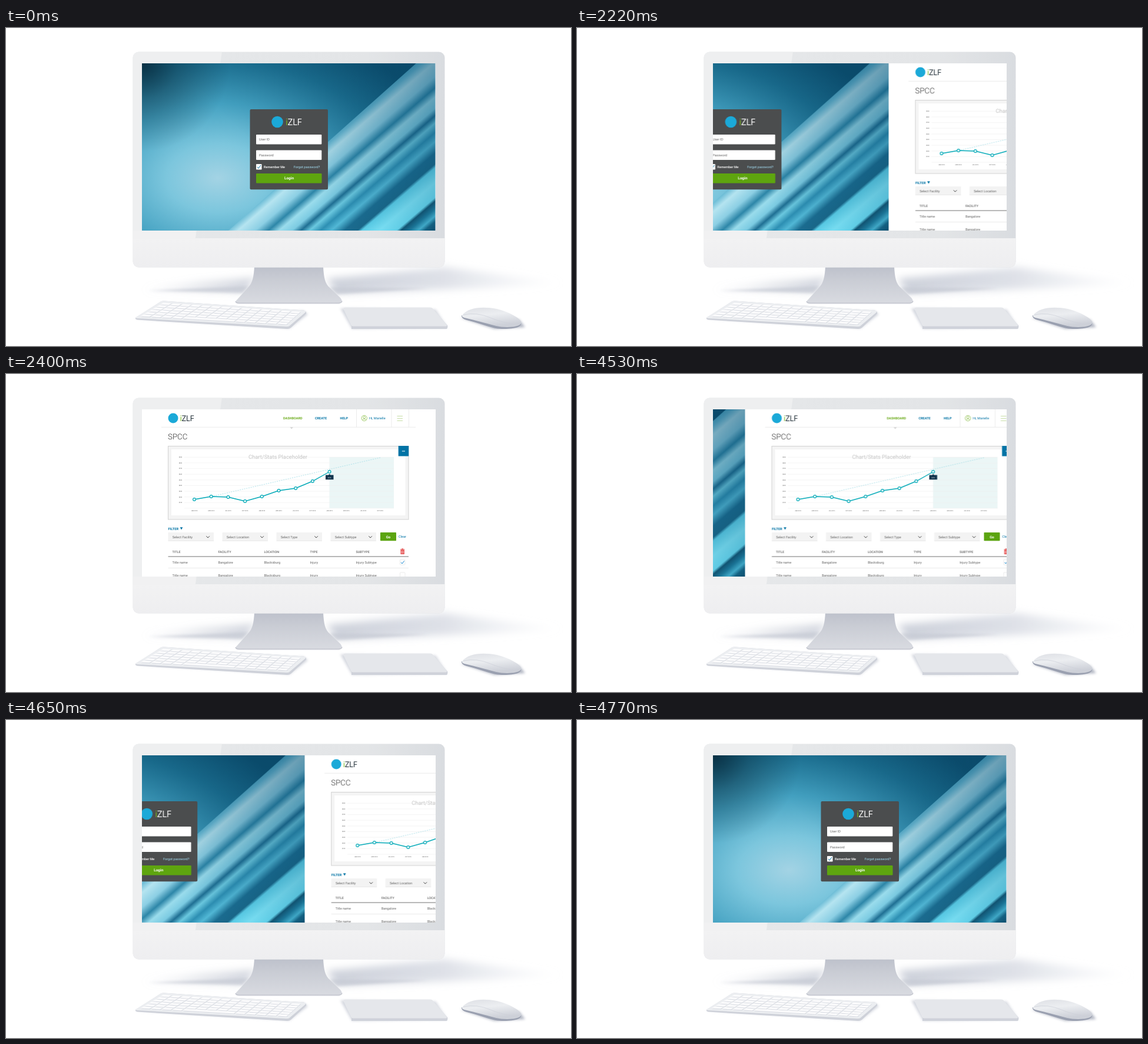
An HTML page for the animation above (4800 ms loop, 960 px wide and 540 px high).

```html
<!DOCTYPE html>
<html lang="en">
<head>
<meta charset="utf-8">
<title>Desktop login and dashboard</title>
<style>
  html, body { margin: 0; width: 100%; height: 100%; overflow: hidden; background: #fff; }
  svg { display: block; width: 100%; height: 100%; }
  text { font-family: Roboto, Arial, sans-serif; font-size: 5.6px; fill: #666; text-rendering: geometricPrecision; }
  .medium { font-weight: 500; }
  .bold { font-weight: 700; }
  .mid { text-anchor: middle; }
  .blue { fill: #0073a5; }
  .white { fill: #fff; }
  .head { font-size: 5.4px; font-weight: 500; }
  .tiny { font-size: 2.4px; font-weight: 500; }
  .brand { font-family: "Open Sans", Arial, sans-serif; letter-spacing: -.4px; }
  .brand tspan { fill: #7ab81e; }
  .rule { stroke: #e6e6e6; stroke-width: .8; fill: none; }

  #strip { animation: slide 4800ms infinite; }
  @keyframes slide {
    0% { transform: translateX(0); animation-timing-function: linear; }
    44.375% { transform: translateX(0); animation-timing-function: steps(10, jump-start); }
    50.625% { transform: translateX(-499px); animation-timing-function: linear; }
    94.375% { transform: translateX(-499px); animation-timing-function: steps(9, jump-start); }
    100% { transform: translateX(0); }
  }
</style>
</head>
<body>
<svg viewBox="0 0 960 540" xmlns="http://www.w3.org/2000/svg">
  <defs>
    <clipPath id="screen"><rect x="231" y="60" width="499" height="284"/></clipPath>
    <clipPath id="case"><rect x="215.5" y="40.5" width="530" height="366" rx="10"/></clipPath>
    <radialGradient id="glow" gradientUnits="userSpaceOnUse" cx="0" cy="0" r="1" gradientTransform="translate(360 255) scale(400 265)">
      <stop offset="0" stop-color="#a3d3e4"/>
      <stop offset=".22" stop-color="#7cc6dd"/>
      <stop offset=".48" stop-color="#43a1c1"/>
      <stop offset=".75" stop-color="#1d7293"/>
      <stop offset="1" stop-color="#0d506f"/>
    </radialGradient>
    <radialGradient id="corner" gradientUnits="userSpaceOnUse" cx="231" cy="60" r="150">
      <stop offset="0" stop-color="#041a28" stop-opacity=".72"/>
      <stop offset=".4" stop-color="#041a28" stop-opacity=".35"/>
      <stop offset="1" stop-color="#041a28" stop-opacity="0"/>
    </radialGradient>
    <linearGradient id="streaks" gradientUnits="userSpaceOnUse" x1="426" y1="288" x2="582" y2="470.4"></linearGradient>
    <linearGradient id="dusk" gradientUnits="userSpaceOnUse" x1="520" y1="290" x2="735" y2="60">
      <stop offset="0" stop-color="#064265" stop-opacity="0"/>
      <stop offset="1" stop-color="#064265" stop-opacity=".45"/>
    </linearGradient>
    <linearGradient id="bezel" x1="0" x2="1">
      <stop offset="0" stop-color="#e6e8ea"/>
      <stop offset=".75" stop-color="#e3e5e7"/>
      <stop offset="1" stop-color="#d9dce0"/>
    </linearGradient>
    <linearGradient id="chin" x1="0" x2="0" y1="0" y2="1">
      <stop offset="0" stop-color="#f2f2f3"/>
      <stop offset="1" stop-color="#eeeef0"/>
    </linearGradient>
    <linearGradient id="neck" x1="0" x2="0" y1="0" y2="1">
      <stop offset="0" stop-color="#bdc1cb"/>
      <stop offset=".35" stop-color="#c9ccd4"/>
      <stop offset="1" stop-color="#d9dbe1"/>
    </linearGradient>
    <linearGradient id="fadeLeft" x1="1" x2="0">
      <stop offset="0" stop-color="#b4bac8"/>
      <stop offset="1" stop-color="#c3c8d4" stop-opacity=".15"/>
    </linearGradient>
    <linearGradient id="fadeRight" x1="0" x2="1">
      <stop offset="0" stop-color="#b4bac8"/>
      <stop offset=".5" stop-color="#d0d4de"/>
      <stop offset="1" stop-color="#e6e9ef" stop-opacity=".1"/>
    </linearGradient>
    <linearGradient id="shell" x1="0" x2=".3" y1="0" y2="1">
      <stop offset="0" stop-color="#dee0e5"/>
      <stop offset=".45" stop-color="#eceef1"/>
      <stop offset="1" stop-color="#cdd0d8"/>
    </linearGradient>
    <filter id="soft" x="-20%" y="-60%" width="140%" height="220%"><feGaussianBlur stdDeviation="7"/></filter>
    <filter id="near" x="-20%" y="-60%" width="140%" height="220%"><feGaussianBlur stdDeviation="2"/></filter>
  </defs>

  <rect width="960" height="540" fill="#fff"/>

  <!-- floor shadows -->
  <g filter="url(#soft)">
    <path d="M232 445 L330 431 L425 424 L405 448 Z" fill="url(#fadeLeft)" opacity=".65"/>
    <path d="M545 426 L745 406 L945 433 L820 441 L562 450 Z" fill="url(#fadeRight)" opacity=".7"/>
  </g>
  <g filter="url(#near)" fill="#c3c7d2" opacity=".7">
    <path d="M240 446 L412 438 L402 450 Z"/>
    <path d="M550 440 L720 442 L562 452 Z"/>
    <path d="M222 494 L482 510 L513 486 L505 480 Z"/>
    <path d="M568 476 L588 511 L750 509 L730 478 Z"/>
    <path d="M772 492 L830 511 L882 508 L872 495 Z" fill="#9399aa"/>
  </g>

  <!-- stand -->
  <path d="M422 405 H539 C540 424 542 434 550 441 L568 458 Q573 464 569 467 L566 468.5 H395 Q388 467 391 463 L411 441 C419 433 421 422 422 405 Z" fill="url(#neck)"/>
  <path d="M390 464 Q390 467 397 467 H564 Q571 467 571 463.500" fill="none" stroke="#bfc2cc" stroke-width="1.200"/>

  <!-- monitor -->
  <g clip-path="url(#case)">
    <rect x="215" y="40" width="531" height="367" fill="url(#bezel)"/>
    <path d="M215 40 H367 L322 357 H215 Z" fill="#eeeff0"/>
    <rect x="215" y="357" width="531" height="50" fill="url(#chin)"/>
    <rect x="215" y="344" width="107" height="14" fill="#f1f1f2"/>
  </g>

  <g clip-path="url(#screen)">
    <g id="strip">
      <g id="login">
        <rect x="231" y="60" width="499" height="284" fill="url(#glow)"/>
        <rect x="231" y="60" width="499" height="284" fill="url(#corner)"/>
        <path d="M360 360 L708 50 H730 V344 Z" fill="url(#streaks)"/>
        <rect x="231" y="60" width="499" height="284" fill="url(#dusk)"/>
        <rect x="414.500" y="138" width="132.500" height="136.300" rx="2" fill="#4b4d4e"/>
        <circle cx="461" cy="159.500" r="9.800" fill="#1ba9d8"/>
        <text class="brand white" x="475" y="165" style="font-size:15.500px"><tspan>i</tspan>ZLF</text>
        <g fill="#fff">
          <rect x="425" y="181" width="111.300" height="16.500" rx="1"/>
          <rect x="425" y="207.500" width="111.300" height="16.500" rx="1"/>
          <rect x="425" y="231" width="9.500" height="9.500" rx=".8"/>
        </g>
        <path d="M427 236 L429 238.300 L432.800 233" fill="none" stroke="#0a75a8"/>
        <text x="430" y="191.200">User ID</text>
        <text x="430" y="217.800">Password</text>
        <text class="medium white" x="438" y="237.800" style="font-size:5.500px">Remember Me</text>
        <text x="488.700" y="237.800" style="fill:#a5dff4">Forgot password?</text>
        <rect x="425" y="247" width="111.500" height="16.500" rx="1" fill="#5ea50f"/>
        <text class="bold white mid" x="481" y="257.300" style="font-size:6.400px">Login</text>
      </g>

      <g transform="translate(499 0)">
        <rect x="230.500" y="60" width="500" height="284" fill="#fff"/>
        <circle cx="284" cy="75" r="8.500" fill="#1ba9d8"/>
        <text class="brand" x="295.500" y="79.800" style="font-size:13.500px;fill:#1c2a33"><tspan>i</tspan>ZLF</text>
        <path class="rule" d="M264 90.300 H696 M595.500 60 V90 M655 60 V90 M684.500 60 V90"/>
        <path d="M482.500 90.300 H488 L485.200 93.500 Z" fill="#d5d5d5"/>
        <text class="bold" x="471" y="77" style="fill:#6bab1a;font-size:5.500px">DASHBOARD</text>
        <text class="bold blue" x="525" y="77" style="font-size:5.500px">CREATE</text>
        <text class="bold blue" x="567.500" y="77" style="font-size:5.500px">HELP</text>
        <text class="blue" x="617" y="77">Hi, Marielle</text>
        <g fill="none" stroke="#8fc04d" stroke-width=".8">
          <circle cx="608.700" cy="75" r="4.700"/>
          <circle cx="608.700" cy="73.800" r="1.900"/>
          <path d="M605.500 78.200 Q608.700 74.300 612 78.200"/>
          <path d="M664.500 71.500 H674 M664.500 75.400 H674 M664.500 79.300 H674" stroke="#b5d48c"/>
        </g>
        <text x="275" y="111" style="font-size:13.300px;font-weight:300;fill:#333">SPCC</text>

        <rect x="275.500" y="122.500" width="408.500" height="124.500" fill="#f4f4f4" stroke="#d2d2d2"/>
        <rect x="281" y="128" width="397.500" height="112" fill="#fff"/>
        <rect x="549.500" y="141" width="109.500" height="87" fill="#ebf6f6"/>
        <g id="chart"></g>
        <text class="mid" x="462" y="144" style="font-size:9.400px;fill:#c4c4c4">Chart/Stats Placeholder</text>
        <rect x="666.700" y="122" width="17.500" height="17.500" fill="#0073a5"/>
        <path d="M672.800 131 H678" stroke="#fff"/>

        <text class="bold blue" x="275.500" y="264.500" style="font-size:5.700px">FILTER</text>
        <path d="M295.700 260.200 H300.300 L298 264.500 Z" fill="#0073a5"/>
        <g id="filters"></g>
        <rect x="636" y="269" width="27" height="14.300" rx=".8" fill="#5ba410"/>
        <text class="bold white mid" x="649.500" y="278.500" style="font-size:6px">Go</text>
        <text class="blue" x="667" y="278.400">Clear</text>

        <g id="table"></g>
        <path d="M275.500 310 H684" stroke="#707070" stroke-width="1.200"/>
        <path class="rule" d="M275.500 329.500 H684"/>
        <path d="M670 298 H677.300 M672.300 297 H675 M671 299.500 H676.300 V305.500 H671 Z M672.800 300 V305 M674.600 300 V305" fill="none" stroke="#e23b3b" stroke-width="1.100"/>
        <rect class="rule" x="669.500" y="315" width="8.500" height="9" rx="1"/>
        <rect class="rule" x="669.500" y="337" width="8.500" height="9" rx="1"/>
        <path d="M671 319.800 L673 322 L676.700 317.300" fill="none" stroke="#1886d0"/>
      </g>
    </g>
  </g>

  <!-- keyboard -->
  <path d="M220 492 L263 464.500 Q265 463 269 463.500 L506 479.500 Q511 481 510 485 L484 509 Q481 511.500 477 511 L223 495.500 Q219 495 220 492 Z" fill="#ced1d9"/>
  <path d="M220 491.500 L263 464.500 Q265 463 269 463.500 L506 479.500 Q511 480.500 508 483.500 L482 505.500 Q480 507.500 476 507 L223 493 Q219 492.500 220 491.500 Z" fill="#eceef1"/>
  <g id="keys" fill="#fbfbfc"></g>

  <!-- notepad -->
  <path d="M574 475 L587 506 V511 H749 Q751 508 750 505 L723 475 Z" fill="#cfd2da"/>
  <path d="M577 474.500 H721 Q723 474.500 725 476.500 L749 504 Q750 506 747 506.500 H590 Q587 506.500 586 504 L573.500 477.500 Q573 474.500 577 474.500 Z" fill="#e5e7eb"/>

  <!-- mouse -->
  <path d="M774 488 Q773 493 783 496 C800 500 815 506 832 510 C845 512 868 511 873 506 Q878 502 872 496 Z" fill="#9aa0b0"/>
  <path d="M775 488 C784 475 808 472 834 477 C858 483 878 495 875 502 C870 509 846 509 833 506 C812 500.500 796 496 783 493 Q773 491 775 488 Z" fill="url(#shell)"/>
  <path d="M777 487 Q800 482 823 492 T873 503" fill="none" stroke="#cdd0d8" stroke-width=".7"/>
</svg>

<script>
  const fill = (id, parts) => { document.getElementById(id).innerHTML = parts.join(''); };
  const label = (x, y, words, cls = '') => `<text class="${cls}" x="${x}" y="${y}">${words}</text>`;
  const range = n => [...Array(n).keys()];

  // bands across the diagonal: position in percent, colour
  const bands = '0 4aa6c4,4 6cbcd6,9 b5e4f0,17 8ccfe4,23 2d86a8,28 9adcec,34 7ccbe2,38 1f6f93,' +
    '42 6bc9e0,47 2d8fb3,52 52b8d6,58 1b6c90,64 1a688a,66 5cd0ea,74 7ee6fa,82 6adcf4,' +
    '84 135674,88 1e7c9e,92 49b8d6,95 176687,100 0f4f6f';
  fill('streaks', bands.split(',').map(band => {
    const [at, hue] = band.split(' ');
    return `<stop offset="${at}%" stop-color="#${hue}"/>`;
  }));

  const xAt = i => 320 + 28.7 * i;
  const months = ['JAN', 'APR', 'JUL', 'OCT'];
  const levels = [213, 208, 209, 216, 208, 198, 194, 182, 166];
  const points = levels.map((y, i) => [xAt(i), y]);
  fill('chart', [
    ...range(10).map(i => `<path d="M303 ${141.3 + 9.63 * i} H659" stroke="#efefef" stroke-width=".6"/>`),
    ...range(9).map(i => label(293.7, 142.2 + 9.63 * i, `$${900 - 100 * i}`, 'tiny')),
    ...range(12).map(i => label(xAt(i), 232.8, `${months[i % 4]} 2015`, 'tiny mid')),
    '<path d="M349 208 L636 142" stroke="#a8dfe8" stroke-width=".9" stroke-dasharray="2 1.800"/>',
    `<polyline points="${points.join(' ')}" fill="none" stroke="#00a9b7" stroke-width="1.400"/>`,
    ...points.map(([x, y]) => `<circle cx="${x}" cy="${y}" r="2.400" fill="#fff" stroke="#00a9b7" stroke-width="1.200"/>`),
    '<path d="M543 171.500 H548 L549.700 169.700 L551.400 171.500 H556.500 V179.300 H543 Z" fill="#12344d"/>',
    label(549.7, 176.5, '$674', 'tiny mid white')
  ]);

  fill('filters', ['Facility', 'Location', 'Type', 'Subtype'].map((name, i) => {
    const x = 275.5 + 92 * i;
    return `<rect x="${x}" y="269" width="77.500" height="14.500" rx=".8" fill="#f3f3f3"/>
      <path d="M${x} 283.300 h77.500" stroke="#dedede" stroke-width=".6"/>
      <path d="M${x + 64.8} 275.300 l2.800 2.800 l2.800 -2.800" fill="none" stroke="#444" stroke-width="1"/>
      ${label(x + 7.2, 278.5, 'Select ' + name)}`;
  }));

  const row = (cells, y, cls) => cells.map((words, i) => label(282.5 + 78 * i, y, words, cls));
  const record = ['Title name', 'Bangalore', 'Blacksburg', 'Injury', 'Injury Subtype'];
  fill('table', [
    ...row(['TITLE', 'FACILITY', 'LOCATION', 'TYPE', 'SUBTYPE'], 303.5, 'head'),
    ...row(record, 321.5),
    ...row(record, 343.6)
  ]);

  // keys laid out on the tilted board
  const spot = (u, v) => [
    267 + 236 * u - 40 * v + 15 * u * v,
    466 + 15.5 * u + 24 * v - 1.5 * u * v
  ];
  const key = (u, v, w, h) => {
    const path = [spot(u, v), spot(u + w, v), spot(u + w, v + h), spot(u, v + h)].join(' ');
    return `<polygon points="${path}" transform="translate(.5 .9)" fill="#d6d9e0"/><polygon points="${path}"/>`;
  };
  fill('keys', range(6).flatMap(r => range(14).map(c => {
    const isSpace = r === 5 && c > 3 && c < 9;
    if (isSpace && c > 4) return '';
    return key(c / 14 + .004, r / 6 + .02, (isSpace ? 5 : 1) / 14 - .012, .125);
  })));
</script>
</body>
</html>
```
